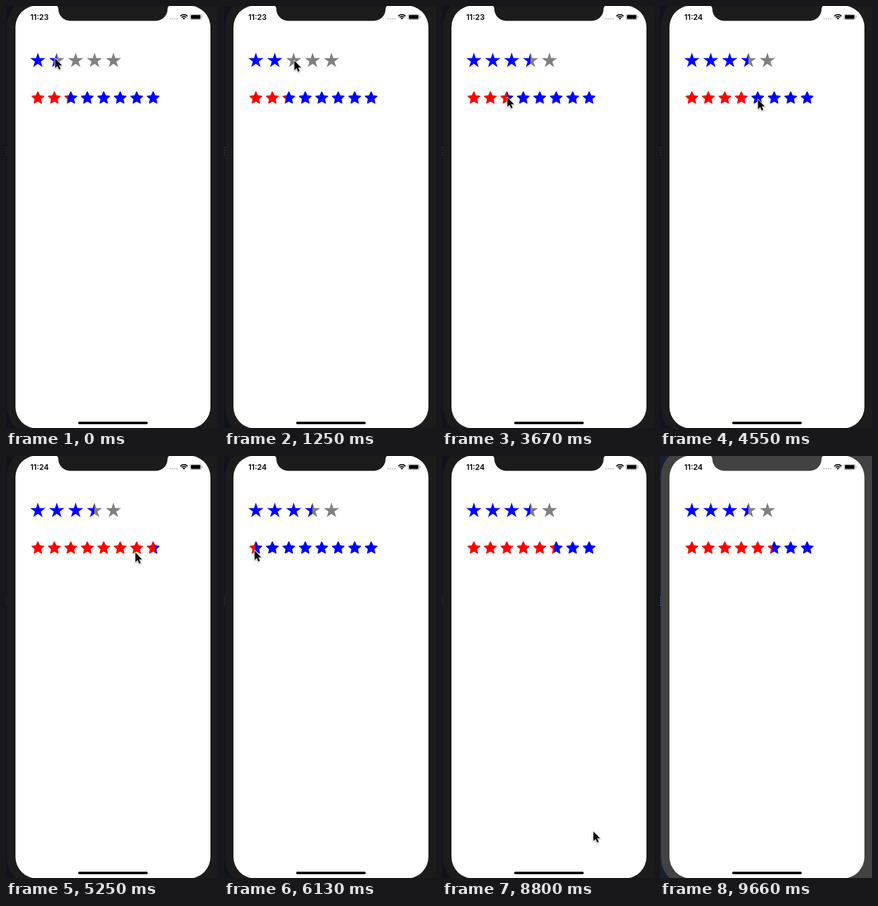
Write an HTML page with a canvas that moves like this. It is 336 px wide and 668 px high and loops after 9.73 s.

```html
<!DOCTYPE html>
<html lang="en">
<head>
<meta charset="utf-8">
<title>Star rating</title>
<style>
html, body { margin: 0; width: 336px; height: 668px; overflow: hidden; background: #1c1c1c; }
canvas { display: block; }
</style>
</head>
<body>
<canvas id="stage" width="336" height="668"></canvas>
<script>
const LOOP = 9730, BLUR = 9660;
const ctx = document.getElementById('stage').getContext('2d');

// Each track starts at a value and eases through moves of { from, to, goal }.
const move = (from, to, ...goal) => ({ from, to, goal });
const pointer = {
  start: [77.5, 82.5],
  moves: [
    move(180, 380, 81, 86), move(750, 980, 111, 86), move(1860, 2200, 108, 84),
    move(2400, 2670, 137, 87), move(3080, 3640, 103, 144), move(4250, 4950, 234, 153),
    move(5080, 5760, 48, 149), move(6150, 6550, 231, 144), move(6670, 7210, 173, 147),
    move(8420, 8620, 229, 583), move(8690, 9190, 312, 669)
  ]
};
const topFill = {
  start: [80.5],
  moves: [move(340, 570, 93), move(1220, 1450, 123), move(2780, 3020, 140)]
};
const bottomFill = {
  start: [97.5],
  moves: [move(3600, 3670, 103), move(4300, 5050, 236), move(5250, 5950, 50), move(7250, 7850, 178)]
};

const ease = p => p * p * (3 - 2 * p);

function at({ start, moves }, t) {
  return moves.reduce((pos, { from, to, goal }) => {
    const p = ease(Math.min(1, Math.max(0, (t - from) / (to - from))));
    return pos.map((v, i) => v + (goal[i] - v) * p);
  }, start);
}

function starPath(cx, cy, r, inner) {
  const path = new Path2D();
  for (let i = 0; i < 10; i++) {
    const a = i * Math.PI / 5, d = i % 2 ? r * inner : r;
    path.lineTo(cx + d * Math.sin(a), cy - d * Math.cos(a));
  }
  path.closePath();
  return path;
}

const topRow = { count: 5, step: 29.95, y: 86.5, r: 12.8, inner: .382, round: 0, off: '#808080', on: '#00f' };
const bottomRow = { count: 8, step: 26.1, y: 145.8, r: 9.6, inner: .47, round: 1.8, off: '#00f', on: '#f00' };

function starRow({ count, step, y, r, inner, round, off, on }, fill) {
  const part = (x, w, color) => {
    ctx.save();
    ctx.beginPath();
    ctx.rect(x, y - 20, w, 40);
    ctx.clip();
    ctx.fillStyle = ctx.strokeStyle = color;
    ctx.lineWidth = round;
    ctx.lineJoin = 'round';
    for (let i = 0; i < count; i++) {
      const star = starPath(50.5 + i * step, y, r, inner);
      ctx.fill(star);
      if (round) ctx.stroke(star);
    }
    ctx.restore();
  };
  part(0, fill, on);
  part(fill, 336 - fill, off);
}

const notch = new Path2D('M77.5 -1Q83 -.5 83 5A18.5 18.5 0 0 0 101.5 23.5H237.5A18.5 18.5 0 0 0 256 5Q256 -.5 261.5 -1Z');
const arrow = new Path2D('M0 0V15.2L3.5 11.9L5.9 17.4L8.4 16.3L6 11H10.7Z');

function pill(x, y, w, h, r, color) {
  ctx.fillStyle = color;
  ctx.beginPath();
  ctx.roundRect(x, y, w, h, r);
  ctx.fill();
}

function phone(idle) {
  const shell = idle ? '#424242' : '#1c1c1c';
  ctx.fillStyle = idle ? '#1a2030' : '#10131b';
  ctx.fillRect(0, 0, 336, 668);
  ctx.fillStyle = idle ? '#3a6690' : '#34383f';
  for (let y = 223; y < 236; y += 4) ctx.fillRect(0, y, 1.5, 2);
  pill(1.5, -14, 360, 696, 47, shell);
  pill(15, -.6, 309, 669.2, 34, '#fff');
  ctx.fillStyle = shell;
  ctx.fill(notch);
  pill(114.3, 657.9, 110.4, 4.1, 2, '#000');
}

function statusBar(time) {
  ctx.fillStyle = '#000';
  ctx.font = '600 12px Inter, sans-serif';
  ctx.fillText(time, 38.5, 21.5);
  for (let i = 0; i < 4; i++) pill(258.8 + i * 3.6, 19, 2.6, 2.6, 1.3, '#ccc');
  ctx.strokeStyle = ctx.fillStyle = '#000';
  ctx.lineWidth = 1.8;
  const wedge = r => {
    ctx.beginPath();
    ctx.arc(282, 21.5, r, -Math.PI * .76, -Math.PI * .24);
  };
  for (const r of [7.8, 4.9]) {
    wedge(r);
    ctx.stroke();
  }
  wedge(2.8);
  ctx.lineTo(282, 21.5);
  ctx.fill();
  pill(291.3, 12.7, 18.5, 9.2, 2.6, '#aaa');
  pill(292.1, 13.5, 16.9, 7.6, 2, '#fff');
  pill(293, 14.2, 15.2, 6.2, 1.4, '#000');
  pill(310.5, 15.8, 1.2, 3, .6, '#aaa');
}

function cursor(x, y) {
  ctx.save();
  ctx.translate(x + .5, y + .5);
  ctx.shadowColor = 'rgba(0,0,0,.35)';
  ctx.shadowBlur = 2;
  ctx.shadowOffsetY = 1;
  ctx.lineWidth = 1.7;
  ctx.lineJoin = 'round';
  ctx.strokeStyle = '#fff';
  ctx.stroke(arrow);
  ctx.shadowColor = 'transparent';
  ctx.fillStyle = '#000';
  ctx.fill(arrow);
  ctx.restore();
}

function draw(now) {
  const t = now % LOOP;
  phone(t >= BLUR);
  statusBar(t < 4000 ? '11:23' : '11:24');
  starRow(topRow, ...at(topFill, t));
  starRow(bottomRow, ...at(bottomFill, t));
  if (t < 9190) cursor(...at(pointer, t));
  requestAnimationFrame(draw);
}
requestAnimationFrame(draw);
</script>
</body>
</html>
```
